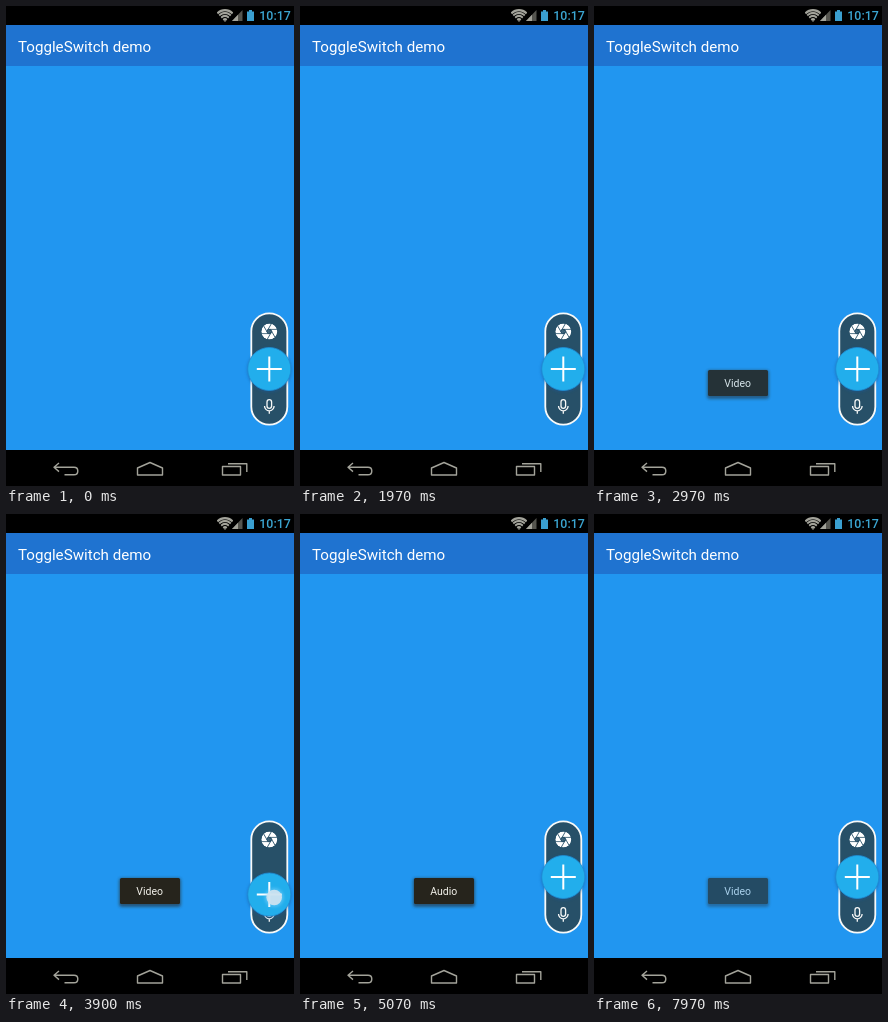
An HTML page that plays this animation: 288x480 px, repeating every 8 s.

```html
<!DOCTYPE html>
<html lang="en">
<head>
<meta charset="utf-8">
<title>ToggleSwitch demo</title>
<style>
  html, body { margin: 0; width: 100%; height: 100%; overflow: hidden; background: #000; }
  svg { display: block; width: 288px; height: 480px; font-family: Roboto, sans-serif; }
  .line { fill: none; stroke: #a3a39a; stroke-width: 1.4; stroke-linejoin: round; }
  .toast { opacity: 0; }
  .toast rect { fill: #26241c; }
  .toast text { fill: #f2f1ea; font-size: 10.5px; text-anchor: middle; }
</style>
</head>
<body>
<svg viewBox="0 0 288 480">
  <defs>
    <filter id="soft" x="-30%" y="-30%" width="160%" height="160%"><feGaussianBlur stdDeviation="1.6"/></filter>
    <clipPath id="disc"><circle r="8"/></clipPath>
    <clipPath id="fan"><path d="M219 16 L211 7 V3 H227 V7 Z"/></clipPath>
  </defs>

  <rect width="288" height="480" fill="#000"/>
  <rect y="19" width="288" height="425" fill="#2196f0"/>
  <rect y="19" width="288" height="41" fill="#1f73d0"/>
  <text x="12" y="46" font-size="15.15" fill="#fff">ToggleSwitch demo</text>

  <!-- status bar -->
  <g clip-path="url(#fan)" fill="none" stroke="#a3a39a" stroke-width="2.1">
    <circle cx="219" cy="14.5" r="1.5"/><circle cx="219" cy="14.5" r="4.6"/>
    <circle cx="219" cy="14.5" r="7.6"/><circle cx="219" cy="14.5" r="10.4"/>
  </g>
  <path d="M226 15 L236.5 4 V15 Z" fill="#55554f"/>
  <path d="M226 15 L232 8.7 V15 Z" fill="#a3a39a"/>
  <path d="M243 4 H246 V5.5 H248 V15 H241 V5.5 H243 Z" fill="#3a9fd0"/>
  <text x="253.3" y="14" font-size="12.4" font-weight="500" fill="#3ba6d2">10:17</text>

  <!-- navigation bar -->
  <g class="line">
    <path d="M53 457 L48 461.3 L53 465.6 M48.5 461.3 H68 Q71.8 461.3 71.8 465 Q71.8 468.8 68 468.8 H58.5"/>
    <path d="M131.5 469 V462 L144 456.5 L156.5 462 V469 Z"/>
    <path d="M216.5 460.5 H234.5 V469 H216.5 Z M222 457.7 H240.8 V466"/>
  </g>

  <g class="toast" id="video">
    <rect x="113" y="364" width="62" height="29" rx="3" opacity=".55" filter="url(#soft)"/>
    <rect x="114" y="364" width="60" height="26" rx="1.5"/>
    <text x="143.7" y="381">Video</text>
  </g>
  <g class="toast" id="audio">
    <rect x="113" y="364" width="62" height="29" rx="3" opacity=".55" filter="url(#soft)"/>
    <rect x="114" y="364" width="60" height="26" rx="1.5"/>
    <text x="143.7" y="381">Audio</text>
  </g>

  <!-- switch -->
  <rect x="245.3" y="307.3" width="36" height="111.4" rx="18" fill="#275068" stroke="#f8f9f8" stroke-width="1.8"/>
  <g transform="translate(263.3 325.5)" clip-path="url(#disc)" fill="#275068" stroke="#275068">
    <circle r="8" fill="#fff" stroke="none"/>
    <g id="blades"></g>
  </g>
  <g fill="none" stroke="#f8f9f8" stroke-width="1.3">
    <rect x="261" y="393.6" width="4.6" height="8.8" rx="2.3"/>
    <path d="M258.5 400 A4.8 4.8 0 0 0 268.1 400 M263.3 404.8 V407.8"/>
  </g>
  <g id="thumb">
    <circle cy="1" r="22" fill="#15579a" opacity=".55" filter="url(#soft)"/>
    <circle r="21.5" fill="#22aeec" stroke="#1f8fd6" stroke-width=".8"/>
    <path d="M-12.5 0 H12.5 M0 -12.5 V12.5" stroke="#fff" stroke-width="2"/>
  </g>
  <g id="touch" opacity="0">
    <circle r="9.5" fill="#8fd8ff" opacity=".45" filter="url(#soft)"/>
    <circle r="7.8" fill="#cfe3ef" opacity=".92"/>
  </g>
</svg>
<script>
const LOOP = 8000, REST = 363, TOP = 325.5, BOTTOM = 400.5;
const $ = id => document.getElementById(id);

$('blades').innerHTML = [0, 1, 2, 3, 4, 5].map(i =>
  `<g transform="rotate(${i * 60})">
    <path d="M0 0 L-1.4 -2.4 H1.4 Z" stroke-width=".2"/><path d="M-.8 -2.1 H9" stroke-width=".8"/>
  </g>`).join('');

const clamp = (v, lo, hi) => Math.min(hi, Math.max(lo, v));
const smooth = p => p * p * (3 - 2 * p);
const easeOut = p => 1 - (1 - p) ** 2;
const ramp = (t, from, to) => clamp((t - from) / (to - from), 0, 1);

// Quick flicks: finger down, end of movement, release
const drags = [
  { down: 2080, end: 2330, up: 2570, from: [263, 364], to: [256.5, 288] },
  { down: 3800, end: 3990, up: 4230, from: [266, 366], to: [270, 398] },
  { down: 7270, end: 7430, up: 7670, from: [263, 364], to: [258, 310] }
];
const toasts = [
  ['video', 2570, 4570],
  ['audio', 4570, 6570],
  ['video', 7670, 9670]
];

function pose(t) {
  let thumb = REST, x = 0, y = 0, touch = 0;
  for (const d of drags) {
    if (t < d.down || t > d.up + 300) continue;
    const p = smooth(ramp(t, d.down, d.end));
    x = d.from[0] + (d.to[0] - d.from[0]) * p;
    y = d.from[1] + (d.to[1] - d.from[1]) * p;
    const held = clamp(REST + y - d.from[1], TOP, BOTTOM);
    thumb = held + (REST - held) * easeOut(ramp(t, d.up, d.up + 260));
    touch = t < d.up ? 1 : 0;
  }
  return { thumb, x, y, touch };
}

function draw(now) {
  const t = now % LOOP, s = pose(t);
  $('thumb').setAttribute('transform', `translate(263.3 ${s.thumb})`);
  $('touch').setAttribute('transform', `translate(${s.x} ${s.y})`);
  $('touch').setAttribute('opacity', s.touch);

  const alpha = { video: 0, audio: 0 };
  for (const [id, show, hide] of toasts) {
    const a = ramp(t, show, show + 460) * (1 - ramp(t, hide, hide + 460));
    alpha[id] = Math.max(alpha[id], a);
  }
  for (const id in alpha) $(id).style.opacity = alpha[id];
}

const begin = performance.now();
function tick() {
  draw(performance.now() - begin);
  requestAnimationFrame(tick);
}
tick();
</script>
</body>
</html>
```
